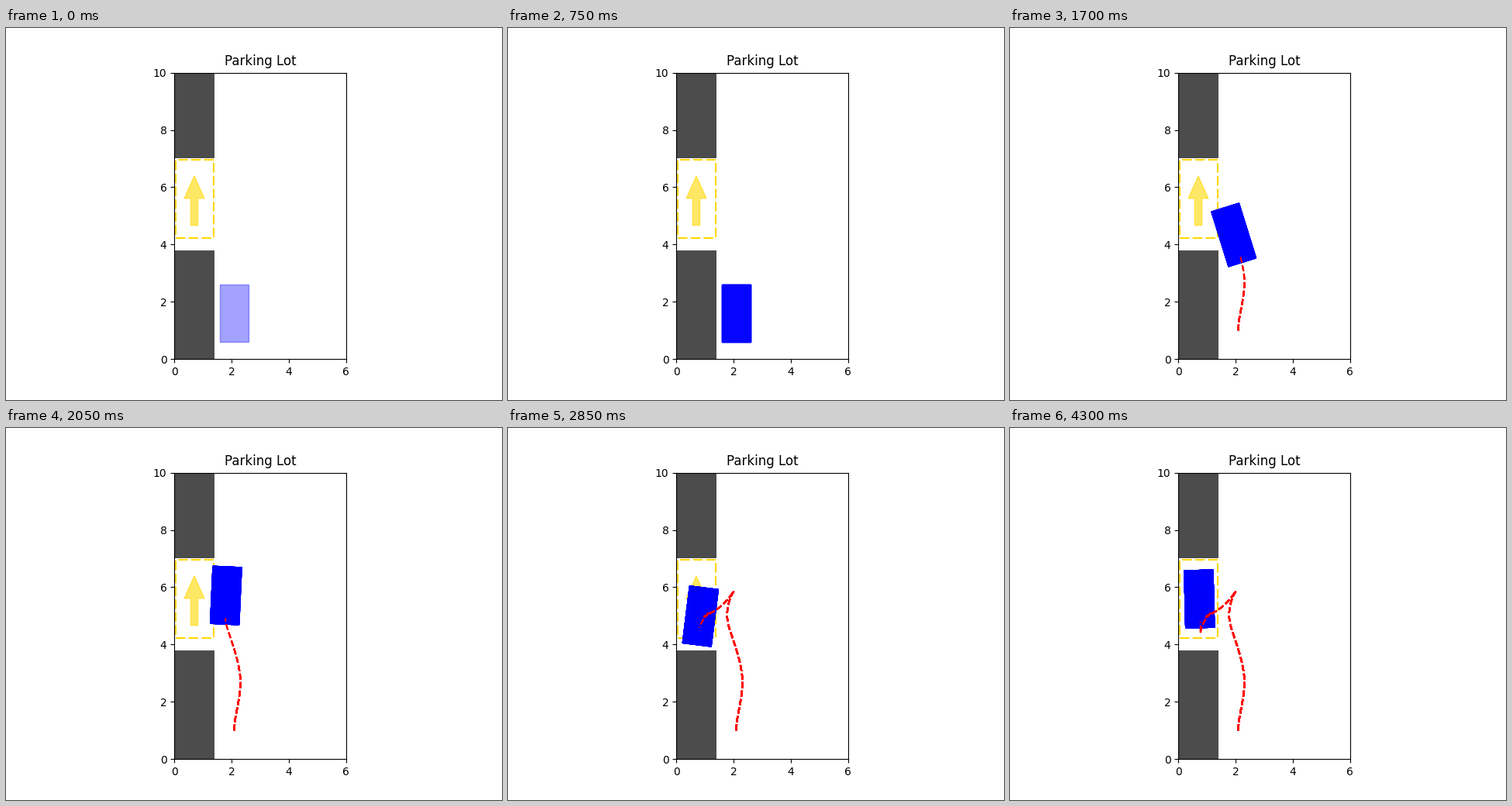
A matplotlib script that plays this animation: 640x480 px, repeating every 5000 ms.

```python
import numpy as np
import matplotlib.pyplot as plt
from matplotlib.animation import FuncAnimation
from matplotlib.patches import Rectangle

FRAMES, INTERVAL = 100, 50
START = 20                           # last frame before the car sets off
STEP = 0.2                           # distance driven per frame
CAR_W, CAR_L, REAR = 1.0, 2.0, 0.4   # REAR: bumper to rear axle

# steps, gear, turn per step in degrees
MOVES = [(3, 1, -4), (4, 1, 1.2), (3, 1, 5.1), (4, 1, 2.3), (4, 1, 0.5),
         (7, 1, -7.3), (3, -1, -4.9), (3, -1, -6), (1, -1, 9), (1, 1, 9),
         (4, -1, 9.85), (2, 1, 7.5), (1, 1, -6.5)]


def direction(deg):
    return np.array([np.cos(np.radians(deg)), np.sin(np.radians(deg))])


def drive():
    """Rear axle position and heading after every step."""
    xy, deg = np.array([2.1, 1.0]), 90.0
    poses = [(xy, deg)]
    for steps, gear, turn in MOVES:
        for _ in range(steps):
            xy = xy + gear * STEP * direction(deg + turn / 2)
            deg += turn
            poses.append((xy, deg))
    return poses


fig, ax = plt.subplots(figsize=(6.4, 4.8), dpi=100)
ax.set_xlim(0, 6)
ax.set_ylim(0, 10)
ax.set_aspect("equal")
ax.set_xticks(range(0, 7, 2))
ax.set_yticks(range(0, 11, 2))
ax.set_title("Parking Lot", pad=6.7)

for bottom, height in ((0, 3.8), (7, 3)):
    ax.add_patch(Rectangle((0, bottom), 1.4, height, fc="black", alpha=0.7, lw=0))
ax.add_patch(Rectangle((0.04, 4.23), 1.34, 2.73, fill=False, ec="gold",
                       lw=1.5, ls=(0, (6, 2))))
ax.arrow(0.7, 4.67, 0, 0.94, width=0.25, head_width=0.7, head_length=0.78,
         color="gold", alpha=0.6)

# The translucent car gains one more layer every frame.
cars = [ax.add_patch(Rectangle((0, 0), CAR_W, CAR_L, color="blue", alpha=0.2))
        for _ in range(FRAMES + 1)]

# Each driven step overlays the whole trail so far once more.
poses = drive()
path = np.array([xy for xy, _ in poses[:-1]])
trails = [ax.plot(*path[:n].T, "r--", lw=1.5)[0]
          for n in range(1, len(path) + 1)]


def update(frame):
    xy, deg = poses[min(max(frame - START, 0), len(poses) - 1)]
    corner = xy - REAR * direction(deg) + CAR_W / 2 * direction(deg + 90)
    for i, car in enumerate(cars):
        car.set_visible(i < frame + 2)
        car.set_xy(corner)
        car.set_angle(deg - 90)
    for i, trail in enumerate(trails):
        trail.set_visible(i < frame - START)
    return cars + trails


anim = FuncAnimation(fig, update, frames=FRAMES, interval=INTERVAL,
                     init_func=lambda: update(0), repeat=True,
                     repeat_delay=0, blit=False)
plt.show()
```
